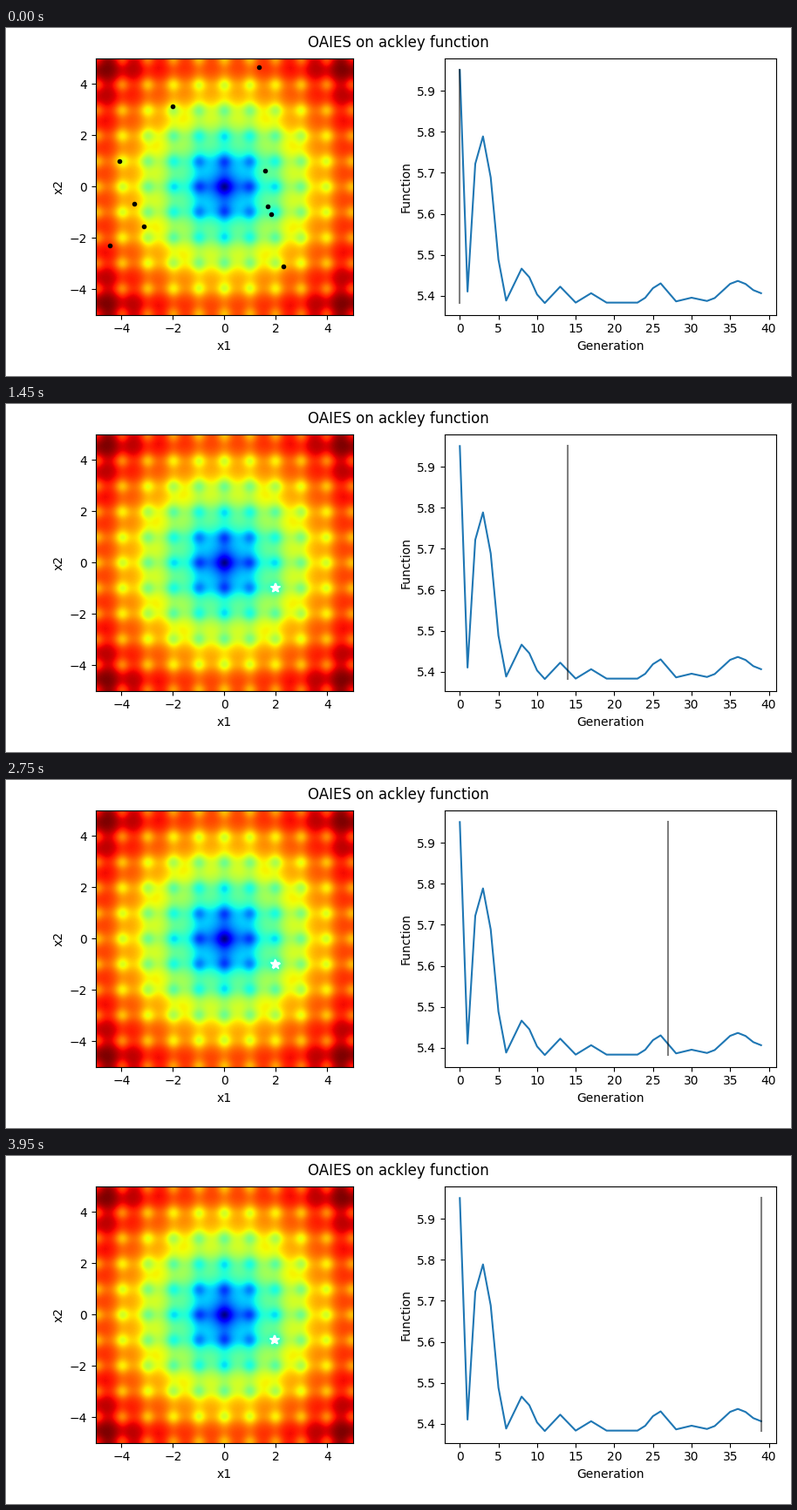
Recreate the animation shown at these times as a matplotlib script. Size 900 by 400 pixels, loop 4 s.

```python
import numpy as np
import matplotlib.pyplot as plt
from matplotlib.animation import FuncAnimation

W, H, DPI = 900, 400, 100
FRAMES, INTERVAL = 80, 50
GENS = np.arange(40)
LOW, HIGH = 5.3815, 5.951
VALLEY = np.array([1.966, -0.983])  # local minimum of the landscape
plt.rcParams["font.family"] = "DejaVu Sans"

# Turning points of the best value: generation, value
TURNS = [
    (0, 5.951), (1, 5.41), (2, 5.722), (3, 5.789), (6, 5.388), (8, 5.466),
    (11, 5.382), (13, 5.422), (15, 5.383), (17, 5.406), (19, 5.383),
    (23, 5.383), (26, 5.43), (28, 5.386), (30, 5.395), (32, 5.387),
    (36, 5.436), (39, 5.406),
]

START = np.array([
    (1.34, 4.66), (-2.01, 3.13), (-4.09, 1.00), (-3.50, -0.67), (-3.13, -1.56),
    (-4.45, -2.28), (2.30, -3.11), (1.58, 0.62), (1.69, -0.77), (1.83, -1.07),
])


def ackley(x, y):
    bowl = -20 * np.exp(-0.2 * np.sqrt((x**2 + y**2) / 2))
    waves = -np.exp((np.cos(2 * np.pi * x) + np.cos(2 * np.pi * y)) / 2)
    return bowl + waves + 20 + np.e


def ease_between(x, points):
    """Join turning points with half cosine waves."""
    px, py = np.array(points).T
    i = np.clip(np.searchsorted(px, x, side="right") - 1, 0, len(px) - 2)
    t = (x - px[i]) / (px[i + 1] - px[i])
    return py[i] + (py[i + 1] - py[i]) * (1 - np.cos(np.pi * t)) / 2


def best_points(values):
    """Distance from the valley follows from the value, the angle drifts."""
    dist = np.sqrt(np.maximum(values - LOW, 0) / 26.8)
    turn = np.radians(np.interp(GENS, [0, 5, 35, 39], [212, 0, -30, -185]))
    return VALLEY + dist[:, None] * np.column_stack([np.cos(turn), np.sin(turn)])


def populations(best):
    """Sample every generation near the best point of the one before."""
    rng = np.random.default_rng(4)
    pops = [START]
    for g in GENS[1:]:
        sigma = 0.025 + 0.8 * 0.4**g
        center = VALLEY + [0.03, 0] + 0.3 * (best[g - 1] - VALLEY)
        pops.append(center + sigma * rng.normal(size=START.shape).clip(-1.6, 1.6))
    return pops


def add_axes(fig, left, width, xlabel, ylabel):
    ax = fig.add_axes([left / W, 70.25 / H, width / W, 294.8 / H])
    ax.set_xlabel(xlabel)
    ax.set_ylabel(ylabel)
    return ax


values = ease_between(GENS, TURNS)
best = best_points(values)
pops = populations(best)

fig = plt.figure(figsize=(W / DPI, H / DPI), dpi=DPI)
fig.suptitle("OAIES on ackley function", x=0.4995)

# Landscape with the population
land = add_axes(fig, 103.0, 294.8, "x1", "x2")
grid = np.linspace(-5, 5, 295)
land.imshow(ackley(*np.meshgrid(grid, grid)), cmap="jet", origin="lower",
            extent=(-5, 5, -5, 5), aspect="auto")
stars = land.scatter([], [], s=54, c="white", marker="*", linewidths=1, zorder=4)
dots, = land.plot([], [], "k.", zorder=5)

# Best value per generation
curve = add_axes(fig, 503.03, 379.9, "Generation", "Function")
curve.plot(GENS, values, color="C0")
cursor, = curve.plot([0, 0], [LOW, HIGH], color="black", alpha=0.5)
pad = 0.05 * (HIGH - LOW)
curve.set(xlim=(-1.95, 40.95), ylim=(LOW - pad, HIGH + pad))


def update(i):
    # Even steps show a new population, odd steps pick its best point
    gen = max(i - 1, 0) // 2
    pop = np.empty((0, 2)) if i % 2 else pops[i // 2]
    dots.set_data(pop[:, 0], pop[:, 1])
    stars.set_offsets([best[gen], VALLEY])
    stars.set_visible(i > 0)
    cursor.set_xdata([gen, gen])
    return stars, dots, cursor


anim = FuncAnimation(fig, update, frames=FRAMES, interval=INTERVAL, repeat=True,
                     repeat_delay=0)
plt.show()
```
